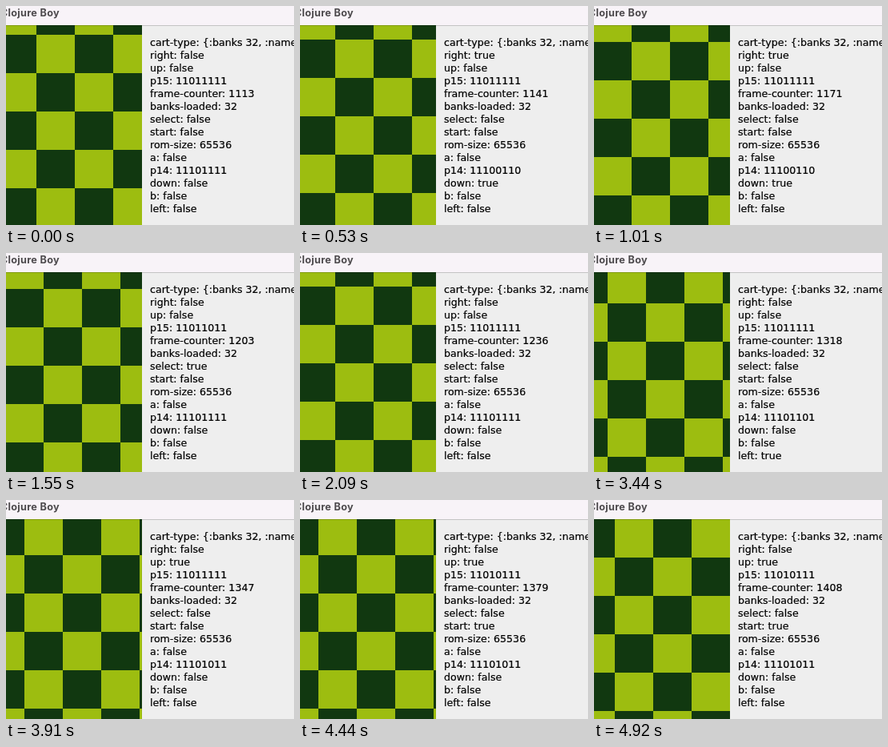
These frames come from a looping animation (360x274 px, 4.94 s). An HTML page:

```html
<!DOCTYPE html>
<html lang="en">
<head>
<meta charset="utf-8">
<title>Clojure Boy</title>
<style>
  html, body { margin: 0; width: 100%; height: 100%; overflow: hidden; background: #eee; }
  header, #screen, pre { position: absolute; margin: 0; white-space: pre; }
  header {
    left: 0; top: 0; width: 100%; height: 24px; z-index: 1;
    background: #f8f3f8 padding-box; border-bottom: 1px solid rgba(0, 0, 0, .18);
  }
  header span {
    position: absolute; right: calc(100% - 67px); top: -1px;
    font: bold 12.7px/20px Inter, sans-serif; letter-spacing: .3px; color: #4d4a4d;
  }
  #screen {
    left: 0; top: 24px; width: 170px; height: 250px;
    background: conic-gradient(#113810 25%, #9dbd10 0 50%, #113810 0 75%, #9dbd10 0) 0 0 / 96px 96px;
  }
  pre {
    left: 180px; top: 38px; width: 180px; overflow: hidden;
    font: 12.6px/16px "DejaVu Sans", sans-serif; color: #000;
    -webkit-text-stroke: .2px #000;
  }
</style>
</head>
<body>
<header><span>Clojure Boy</span></header>
<div id="screen"></div>
<pre id="state"></pre>
<script>
const LOOP = 4940, FIRST_COUNT = 1113;
const screenEl = document.getElementById('screen');
const stateEl = document.getElementById('state');

// Refresh times: runs of evenly spaced ticks [first, last, count]
const ticks = [0];
for (const [first, last, count] of [
  [120, 590, 9], [650, 1130, 9], [1190, 1670, 9], [1730, 2210, 9], [2270, 2750, 9],
  [2800, 3320, 10], [3380, 3850, 9], [3910, 4380, 9], [4440, 4920, 9],
]) {
  for (let i = 0; i < count; i++) {
    ticks.push(Math.round((first + (last - first) * i / (count - 1)) / 10) * 10);
  }
}

// When each button is held down, in ms
const held = {
  right: [530, 1260], down: [530, 1260], select: [1300, 2050], a: [2200, 2990],
  left: [3080, 3640], up: [3700, LOOP], start: [4440, LOOP],
};

function render(now) {
  const t = now % LOOP;
  const tick = ticks.findLast(time => time <= t);
  const elapsed = Math.max(0, Math.floor(0.0607 * tick - 3.3));
  const pressed = name => name in held && tick >= held[name][0] && tick < held[name][1];
  const port = (high, names) => high + names.map(name => pressed(name) ? 0 : 1).join('');
  const button = name => `${name}: ${pressed(name)}`;

  // The map scrolls one 3px dot diagonally every second count
  const dots = 12 - Math.ceil(elapsed / 2);
  screenEl.style.backgroundPosition = `${dots * 3 + 2}px ${dots * 3 - 24}px`;

  const text = [
    'cart-type: {:banks 32, :name',
    button('right'),
    button('up'),
    'p15: ' + port('1101', ['start', 'select', 'b', 'a']),
    'frame-counter: ' + (FIRST_COUNT + elapsed),
    'banks-loaded: 32',
    button('select'),
    button('start'),
    'rom-size: 65536',
    button('a'),
    'p14: ' + port('1110', ['down', 'up', 'left', 'right']),
    button('down'),
    button('b'),
    button('left'),
  ].join('\n');
  if (stateEl.textContent !== text) stateEl.textContent = text;
}

const begin = performance.now();
(function loop() {
  render(performance.now() - begin);
  requestAnimationFrame(loop);
})();
</script>
</body>
</html>
```
